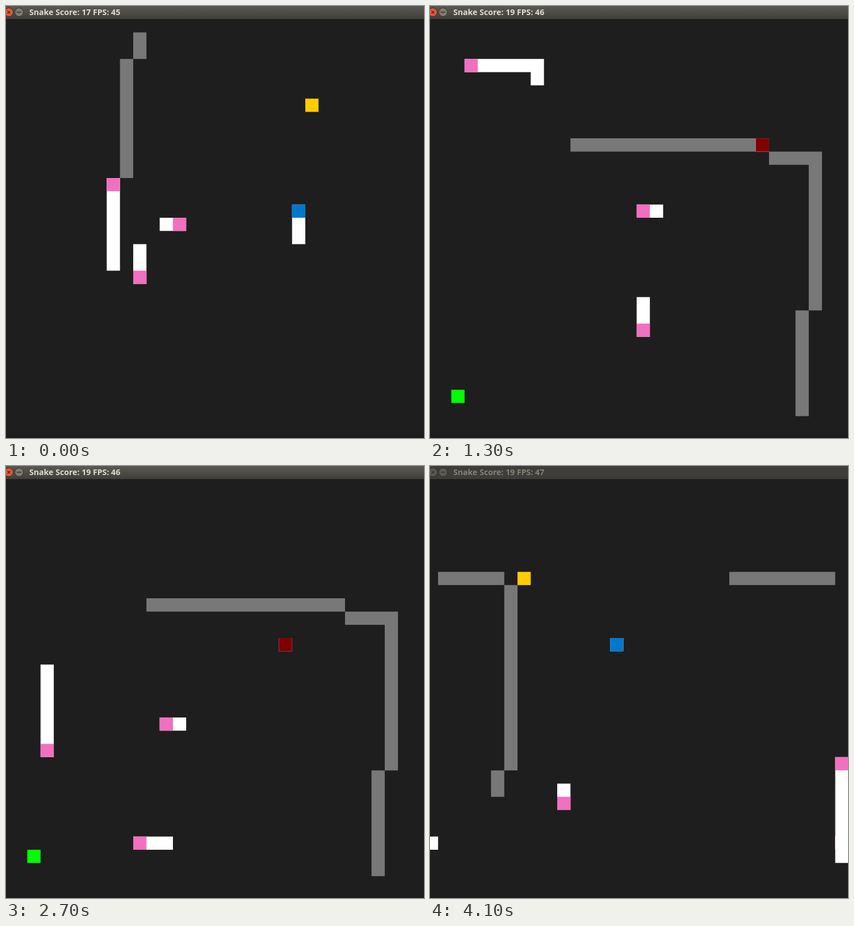
An HTML page with a canvas that plays this animation: 736 by 761 pixels, repeating every 4.2 s.

```html
<!DOCTYPE html>
<html lang="en">
<head>
<meta charset="utf-8">
<title>Snake</title>
<style>
html, body { margin: 0; width: 100%; height: 100%; overflow: hidden; background: #1e1e1e; }
canvas, header, svg { position: absolute; left: 0; top: 0; display: block; }
header { width: 736px; height: 23px; background: linear-gradient(#5b5a51, #504f48 40%, #3f3e39); color: #dfdbd2; }
header span { position: absolute; left: 41px; top: 1px; font: bold 14.15px/20px "Open Sans", "Noto Sans", sans-serif; white-space: pre; }
circle { stroke: #33322e; }
.close { fill: #e9582f; }
.min { fill: #7d7b72; }
.mark { stroke: #3a332d; stroke-width: 1.4; fill: none; }
.idle { background: #3e3d39; color: #85827a; }
.idle circle { fill: #5c5a54; }
</style>
</head>
<body>
<canvas width="736" height="761"></canvas>
<header>
  <svg width="40" height="23">
    <circle class="close" cx="5" cy="11" r="7.5"/>
    <circle class="min" cx="23" cy="11" r="7.5"/>
    <path class="mark" d="M2.5 8.5l5 5m0-5l-5 5M19 11h8"/>
  </svg>
  <span></span>
</header>
<script>
const ctx = document.querySelector('canvas').getContext('2d');
const bar = document.querySelector('header');
const label = bar.querySelector('span');
const CELL = 23.31, LEFT = 14.2, FIRST_COL = -2, LAST_COL = 30;
const PINK = '#f170c0', BLUE = '#0078cc', YELLOW = '#ffcc00', RED = '#800000', GREEN = '#00ff00';
const DIRS = { U: [0, -1], D: [0, 1], L: [-1, 0], R: [1, 0] };
const STALLED = new Set([25, 26, 30, 33, 35, 36, 39]);

// Each wall is a start cell and the moves that build it
const boards = [
  { from: 0, food: [22, 7, YELLOW], walls: [route(9, 2, 'D'), route(8, 4, 'D8')] },
  { from: 9, food: [1, 29, GREEN], walls: [route(10, 10, 'R14'), route(25, 11, 'R3 D11'), route(27, 23, 'D7')] },
  { from: 37, food: [6, 8, YELLOW], walls: [route(0, 8, 'R4'), route(22, 8, 'R7'), route(5, 9, 'D13'), route(4, 23, 'D')] }
];

// The pace picks up as the game goes on
const turns = s => s + Math.max(0, s - 9) / 4 + Math.max(0, s - 31) / 4;

// "head" gives how far along its route a snake has come
const player = {
  cells: route(7, 19, 'U15 L5 D25 L5 U7'),
  head: s => 6 + turns(s)
};
const rival = {
  cells: route(21, 17, 'U10 R3 D6 L11'),
  head: s => s < 13 ? 2 + turns(s) : 16 + (s - 13) / 2
};
const small = {
  cells: route(11, 16, 'R2URU R2DL DLDLDLDLDL LD5'),
  head: s => 1 + Math.min(s, 0.56 * s + 1.21)
};
const hunter = {
  cells: route(9, 18, 'D3 R6 D7 L18'),
  head: s => 2 + Math.min(s, Math.max(0.7 * s + 1.5, turns(s) - 19))
};

// Moves like "U3 L2" become the list of cells visited
function route(col, row, moves) {
  const cells = [[col, row]];
  for (const [, dir, count] of moves.matchAll(/([UDLR])(\d*)/g)) {
    for (let i = 0; i < (+count || 1); i++) {
      col += DIRS[dir][0];
      row += DIRS[dir][1];
      if (col < FIRST_COL) col = LAST_COL;
      cells.push([col, row]);
    }
  }
  return cells;
}

// One path per group, so that neighbouring cells join without seams
function fill(cells, color) {
  ctx.beginPath();
  for (const [col, row] of cells) ctx.rect(LEFT + col * CELL, row * CELL, CELL, CELL);
  ctx.fillStyle = color;
  ctx.fill();
}

function snake({ cells, head }, step, length, color) {
  const end = Math.floor(head(step)) + 1;
  const body = cells.slice(Math.max(0, end - length), end);
  fill(body, '#fff');
  fill(body.slice(-1), color);
}

function draw(step) {
  while (STALLED.has(step)) step--;
  const board = boards.findLast(b => b.from <= step);
  const first = board === boards[0], slowed = board === boards[1];
  const eaten = slowed && step >= 34;

  ctx.fillStyle = '#1e1e1e';
  ctx.fillRect(0, 0, 736, 757);
  ctx.fillStyle = '#1f1a1d';
  ctx.fillRect(0, 757, 736, 4);
  fill(board.walls.flat(), '#787878');
  if (!eaten) fill([board.food], board.food[2]);

  snake(small, step, 2, PINK);
  snake(hunter, step, 3, PINK);
  snake(rival, step, first ? 3 : 1, slowed ? RED : BLUE);
  snake(player, step, step < 34 ? 7 : 9, PINK);

  const fps = first ? 45 : step < 32 ? 46 : 47;
  label.textContent = `Snake Score: ${first ? 17 : 19} FPS: ${fps}`;
  bar.className = step === 41 ? 'idle' : '';
}

const start = performance.now();
function tick() {
  draw(Math.floor((performance.now() - start) % 4200 / 100));
  requestAnimationFrame(tick);
}
tick();
</script>
</body>
</html>
```
